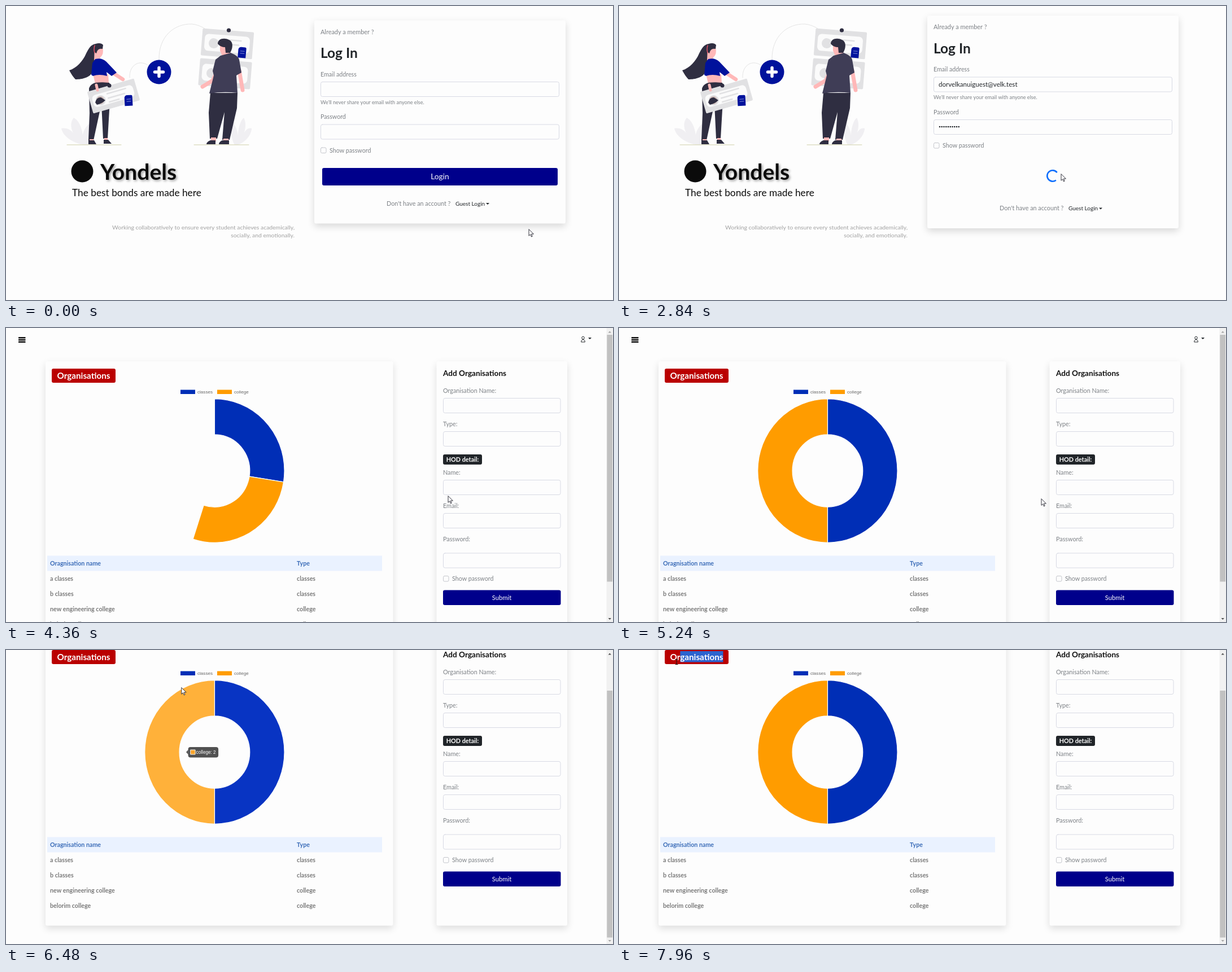
An HTML page with a canvas for the animation above (8000 ms loop, 1075 by 521 pixels).

```html
<!DOCTYPE html>
<html lang="en">
<head>
<meta charset="utf-8">
<title>Sign in and dashboard</title>
<style>
  html, body { margin: 0; width: 100%; height: 100%; overflow: hidden; background: #fdfdfd; }
  canvas { display: block; width: 1075px; height: 521px; }
</style>
</head>
<body>
<canvas id="stage" width="1075" height="521"></canvas>
<script>
const ctx = document.getElementById('stage').getContext('2d');
const LOOP = 8000, PAGE = 4160;
const SANS = 'Lato, "Open Sans", sans-serif', ARIAL = '"Liberation Sans", Arial, sans-serif';
const GREY = '#7d8186', INK = '#212529', NAVY = '#00008b', BLUE = '#00129c', DARK = '#2f2e41', SKIN = '#ffb8b8';

const clamp = v => Math.max(0, Math.min(1, v));
const span = (t, a, b) => clamp((t - a) / (b - a));
const mix = (a, b, k) => a + (b - a) * k;
const quart = k => 1 - (1 - k) ** 4;
const mixRgb = (a, b, k) => `rgb(${a.map((v, i) => Math.round(mix(v, b[i], k)))})`;

// Position along [time, x, y] stops
function along(stops, t) {
  let i = 0;
  while (i < stops.length - 2 && t > stops[i + 1][0]) i++;
  const [a, b] = [stops[i], stops[i + 1]], k = span(t, a[0], b[0]);
  return [mix(a[1], b[1], k), mix(a[2], b[2], k)];
}

function text(str, x, cy, size, color = GREY, weight = 400, align = 'left', family = SANS) {
  ctx.font = `${weight} ${size}px ${family}`;
  ctx.textAlign = align;
  ctx.textBaseline = 'alphabetic';
  ctx.fillStyle = color;
  ctx.fillText(str, x, cy + size * 0.34);
}

function box(x, y, w, h, r, fill, stroke, line = 1) {
  ctx.beginPath();
  ctx.roundRect(x, y, w, h, r);
  if (fill) { ctx.fillStyle = fill; ctx.fill(); }
  if (stroke) { ctx.strokeStyle = stroke; ctx.lineWidth = line; ctx.stroke(); }
}

function card(x, y, w, h, shade = 0.15) {
  ctx.save();
  ctx.shadowColor = `rgba(0,0,0,${shade})`;
  ctx.shadowBlur = 13;
  ctx.shadowOffsetY = 5;
  box(x, y, w, h, 3, '#fdfdfd');
  ctx.restore();
}

const field = (x, y, w, h = 26) => box(x + .5, y + .5, w - 1, h, 3, '#fdfdfd', '#d8dae4');
const tick = (x, y) => box(x + .5, y + .5, 9.5, 9.5, 2, '#fdfdfd', '#c4c6cc');
function shape(d, fill) { ctx.fillStyle = fill; ctx.fill(new Path2D(d)); }
function line(d, color, width) {
  ctx.strokeStyle = color;
  ctx.lineWidth = width;
  ctx.lineCap = ctx.lineJoin = 'round';
  ctx.stroke(new Path2D(d));
}
function dot(x, y, r, fill) {
  ctx.fillStyle = fill;
  ctx.beginPath();
  ctx.arc(x, y, r, 0, 7);
  ctx.fill();
}
function caret(x, y) { shape(`M${x} ${y}h6l-3 3z`, INK); }

function idCard(x, y, w, h, deg) {
  ctx.save();
  ctx.translate(x, y);
  ctx.rotate(deg * Math.PI / 180);
  box(-w / 2, -h / 2, w, h, 2, '#e1e1e3');
  box(-w / 2 + 5, -h / 2 + 9, w - 11, h - 18, 7, '#fbfbfb');
  line('M-10 -7H24M-10 1H20M-10 8H8', '#e1e1e3', 2.5);
  dot(-24, 1, 9, '#e1e1e3');
  ctx.restore();
}
function badgeDoc(x, y, deg) {
  ctx.save();
  ctx.translate(x, y);
  ctx.rotate(deg * Math.PI / 180);
  shape('M-7 -6Q-6 -10 -2 -10H5Q7 -10 7 -8V9H-7z', BLUE);
  line('M-3 -3H4M-3 1H4', '#8890d8', 1);
  ctx.restore();
}

function leaves(x, dir) {
  ctx.save();
  ctx.translate(x, 246);
  ctx.scale(dir, 1);
  shape('M0 0C-20 -4 -36 -15 -39 -29C-29 -31 -22 -26 -18 -21C-23 -31 -23 -41 -17 -48C-5 -41 0 -24 0 0z', '#f0eff2');
  shape('M-2 0C-4 -20 3 -34 15 -40C20 -25 16 -8 8 0z', '#f0eff2');
  ctx.restore();
}

function woman() {
  shape('M168 67C151 65 148 73 142 84C136 98 125 110 112 114C116 121 119 126 123 130C135 130 151 127 155 113C159 103 158 91 164 87z', DARK);
  shape('M157 72L171 73Q174 86 167 91L166 97L156 96z', SKIN);
  shape('M154 80C151 66 167 63 172 69L171 76Q162 74 160 84z', DARK);
  line('M157 70Q155 77 157 83', '#f0566a', 1.4);
  shape('M159 122L181 121L182 137L160 140z', SKIN);
  line('M190 119L207 130M157 119L164 149', SKIN, 6.5);
  shape('M147 146C151 136 158 134 183 136C186 148 186 160 183 184L180 235H172L169 173L155 238H146L148 190z', DARK);
  shape('M148 236h7v5h-7zM174 234h6v6h-6z', SKIN);
  shape('M146 238h10l4 7h-14zM173 237h8l6 7h-14z', DARK);
  shape('M158 94Q170 91 178 99L196 118L187 124L178 117L179 124Q165 120 154 124L151 122L153 101z', BLUE);
  idCard(190.5, 159.5, 86, 40, -16);
  dot(167, 167, 7, '#ceb9b6');
  shape('M158 171Q160 162 168 162L176 167Q170 173 161 175z', DARK);
  dot(183, 141, 3.5, DARK);
  badgeDoc(217, 168, -3);
  line('M160 140L162 149', SKIN, 5);
}

function man() {
  idCard(392, 67, 91, 48, 4.5);
  idCard(388, 120, 92, 48, 4.5);
  dot(394.5, 43, 3.6, DARK);
  badgeDoc(418, 83, 5);
  line('M374 116L366 132L348 143M413 114L419 149', SKIN, 7);
  shape('M379 66L396 68L398 88L384 91L379 79z', SKIN);
  shape('M375 67C375 57 388 55 397 61C404 67 400 78 397 83H389L388 73Q380 73 375 67z', DARK);
  shape('M362 154H410L409 181L396 237H383L387 188L374 235H361L359 189z', DARK);
  shape('M363 233h9v7h-9zM385 235h9v5h-9z', SKIN);
  shape('M362 238h9v7h-16q0-4 7-7zM383 238h12v7h-18q0-4 6-7z', DARK);
  shape('M380 88L398 83Q411 88 413 95L417 118L408 123L410 154Q385 151 360 155L368 123L366 115L371 95z', '#3f3d56');
}

function illustration() {
  line('M219 127C218 105 235 95 250 104M271 95C270 54 298 31 329 32Q341 33 352 40', '#dedede', .8);
  leaves(137, 1);
  leaves(410, -.65);
  line('M108 246H204M333 246H430', '#d0d0a8', 1);
  woman();
  man();
  dot(271, 117, 21.5, BLUE);
  line('M271 109.5V124.5M263.5 117H278.5', '#fff', 5.5);

  dot(135, 293, 19.5, '#0b0b0b');
  ctx.save();
  ctx.shadowColor = 'rgba(0,0,0,.4)';
  ctx.shadowBlur = 4;
  ctx.shadowOffsetX = ctx.shadowOffsetY = 2;
  text('Yondels', 167, 295, 39, '#0b0b0b', 700);
  ctx.restore();
  text('The best bonds are made here', 117, 331, 17.3, '#0b0b0b');
  text('Working collaboratively to ensure every student achieves academically,', 511, 392.5, 10.4, '#a2a2a2', 400, 'right');
  text('socially, and emotionally.', 511, 406.5, 10.4, '#a2a2a2', 400, 'right');
}

function spinner(t) {
  const a = (t - 2825) / 750 * Math.PI * 2;
  ctx.beginPath();
  ctx.arc(768, 301, 9.7, a + Math.PI / 4, a + Math.PI * 1.75);
  ctx.strokeStyle = '#0d6efd';
  ctx.lineWidth = 2.6;
  ctx.lineCap = 'butt';
  ctx.stroke();
}

function menu(pos) {
  box(790, 340, 73.5, 22, 4, '#fdfdfd', '#b3d0f5', 2.5);
  box(790.5, 363.5, 111, 101, 3, '#fdfdfd', '#dcdce2');
  ['Manager', 'Dean', 'Faculty', 'Student'].forEach((name, i) => {
    const y = 381 + i * 22.4;
    if (Math.abs(pos[1] - y) < 11.2) box(791, y - 11, 110, 22, 0, '#eceef1');
    text(name, 802, y, 11.8, INK);
  });
}

function login(t, pos) {
  const busy = t >= 2800, up = busy ? -8.5 : 0, filled = t >= 2000;
  illustration();
  card(546, 25.5 + up, 445, 360 - 2 * up);
  ctx.save();
  ctx.translate(0, up);
  text('Already a member ?', 557, 46, 10.9);
  text('Log In', 557, 84, 24.5, INK, 700);
  text('Email address', 557, 121, 10.7);
  field(557, 134, 423);
  text("We'll never share your email with anyone else.", 557, 170.5, 9.1);
  text('Password', 557, 196.5, 10.7);
  field(557, 209.5, 423);
  tick(557, 250.5);
  text('Show password', 573, 256, 10.7);
  if (filled) {
    text('dorvelkanuiguest@velk.test', 566, 147.5, 11.6, INK);
    for (let i = 0; i < 10; i++) dot(568 + i * 3.75, 222.5, 1.3, INK);
  }
  ctx.restore();
  if (busy) spinner(t);
  else {
    box(560, 287, 417, 31, 3, NAVY);
    text('Login', 768.5, 302.5, 13.8, '#fff', 400, 'center');
  }
  text("Don't have an account ?", 674, 350 - up, 10.8);
  if (t >= 1000 && !filled) menu(pos);
  text('Guest Login', 796, 350.5 - up, 10, INK);
  caret(850, 349 - up);
}

function slice(from, to, fill) {
  ctx.beginPath();
  ctx.arc(0, 0, 123.7, from - Math.PI / 2, to - Math.PI / 2);
  ctx.arc(0, 0, 62.3, to - Math.PI / 2, from - Math.PI / 2, true);
  ctx.closePath();
  ctx.fillStyle = fill;
  ctx.fill();
  ctx.strokeStyle = '#fdfdfd';
  ctx.lineWidth = 1.3;
  ctx.lineJoin = 'miter';
  ctx.stroke();
}

function donut(t) {
  const grow = quart(span(t, 4180, 5180));
  const onBlue = quart(span(t, 6190, 6590)) * (1 - quart(span(t, 6386, 6786)));
  const onOrange = quart(span(t, 6386, 6786)) * (1 - quart(span(t, 6500, 6900)));
  if (!grow) return;
  ctx.save();
  ctx.translate(369.4, 253);
  ctx.scale(1, 1.03);
  slice(0, grow * Math.PI, mixRgb([0, 46, 182], [24, 64, 222], onBlue));
  slice(grow * Math.PI, grow * Math.PI * 2, mixRgb([255, 156, 0], [255, 187, 88], onOrange));
  ctx.restore();
}

function tooltip(t) {
  const alpha = .68 * span(t, 6190, 6390) * (1 - span(t, 6500, 6700));
  if (!alpha) return;
  const orange = t >= 6386, k = quart(span(t, 6386, 6786)), x = mix(406, 280, k), y = 253;
  ctx.save();
  ctx.globalAlpha = alpha;
  box(x, y - 9, 53.5, 18.5, 4, '#000');
  shape(orange ? `M${x} ${y - 4}l-3.5 4l3.5 4z` : `M${x + 53.5} ${y - 4}l3.5 4l-3.5 4z`, '#000');
  ctx.globalAlpha = clamp(alpha * 1.45);
  box(x + 4.5, y - 4, 8, 8, 0, orange ? '#ffa62a' : '#1238cc', '#fff', 1);
  text(orange ? 'college: 2' : 'classes: 2', x + 14, y, 8.2, '#fff', 400, 'left', ARIAL);
  ctx.restore();
}

function heading(t, pos) {
  const word = 'Organisations', size = 15.2;
  box(81, 72, 113, 25, 3, '#ba0000');
  ctx.font = `700 ${size}px ${SANS}`;
  const left = 137.5 - ctx.measureText(word).width / 2, right = 275 - left;
  if (t >= 7400) {
    let from = right;
    for (let i = word.length; i >= 0; i--) {
      const x = left + ctx.measureText(word.slice(0, i)).width;
      if (x < pos[0] + 3) break;
      from = x;
    }
    box(from, 74, right - from, 19.5, 0, '#2c63cf');
  }
  text(word, left, 84.5, size, '#fff', 700);
}

function dashboard(t, pos, scroll) {
  ctx.save();
  ctx.translate(0, -scroll);
  for (let i = 0; i < 3; i++) box(22, 16 + i * 3.7, 12.5, 2.6, .5, '#111');
  ctx.beginPath();
  ctx.arc(1022, 17.5, 2.3, 0, 7);
  ctx.strokeStyle = INK;
  ctx.lineWidth = 1;
  ctx.stroke();
  line('M1018.7 24.5Q1018.7 20.7 1022 20.7Q1025.3 20.7 1025.3 24.5z', INK, 1);
  caret(1031, 17);

  card(70, 59, 615.5, 501.5, .13);
  card(762.5, 59, 231.5, 501.5, .13);
  heading(t, pos);
  box(309, 109.5, 26, 7.5, 0, '#002eb6');
  text('classes', 339, 113, 8.1, '#666', 400, 'left', ARIAL);
  box(374, 109.5, 26, 7.5, 0, '#ff9c00');
  text('college', 404, 113, 8.1, '#666', 400, 'left', ARIAL);
  donut(t);
  tooltip(t);

  box(73, 403.5, 593, 27, 0, '#eaf2ff');
  const rows = [['Oragnisation name', 'Type'], ['a classes', 'classes'], ['b classes', 'classes'],
    ['new engineering college', 'college'], ['belorim college', 'college']];
  rows.forEach(([name, type], i) => {
    const color = i ? '#797979' : '#3c6db8', y = 417.3 + i * 26.9;
    text(name, 78, y, 10.7, color, 700);
    text(type, 515, y, 10.7, color, 700);
  });

  text('Add Organisations', 774, 80.5, 13.6, '#111', 700);
  const labels = [['Organisation Name:', 111, 124], ['Type:', 170, 183], ['Name:', 256, 269],
    ['Email:', 315.3, 328], ['Password:', 374, 398.5]];
  for (const [name, y, fy] of labels) {
    text(name, 774, y, 10.8);
    field(774, fy, 208.5);
  }
  box(774, 224, 69, 18, 3, INK);
  text('HOD detail:', 808.5, 233.3, 10.8, '#fff', 700, 'center');
  tick(774, 439);
  text('Show password', 790, 444.7, 10.7);
  box(774, 464.5, 208.5, 26.5, 3, NAVY);
  text('Submit', 878, 478, 11.2, '#fff', 400, 'center');
  ctx.restore();

  box(1063.5, 0, 11.5, 521, 0, '#f1f1f1');
  box(1064.3, 12 + scroll * .833, 9.7, 437.5, 0, '#c1c1c1');
  shape('M1066.5 8.5h5.4l-2.7-3z', scroll ? '#505050' : '#a3a3a3');
  shape('M1066.5 514h5.4l-2.7 3z', scroll > 71.5 ? '#a3a3a3' : '#505050');
}

const PATH = [[0, 926, 396], [80, 926, 396], [120, 955, 394], [280, 955, 394], [600, 880, 372], [880, 799, 353],
  [1180, 799, 353], [1480, 828, 424], [1600, 828, 424], [1850, 823, 381], [2080, 823, 381], [2640, 783, 298],
  [4520, 783, 298], [5000, 748, 303], [5880, 748, 303], [6190, 493, 165], [6386, 369.5, 98], [6480, 311, 67],
  [7000, 193, 21], [7400, 193, 21], [7940, 102, 21], [8000, 102, 21]];

function pointer(t, [x, y]) {
  ctx.save();
  ctx.translate(x, y);
  const overMenu = t >= 840 && t < 2000;
  const overButton = t < 2800 && x > 560 && x < 977 && y > 287 && y < 318;
  const overHeading = t > 6600 && x < 194 && y < 24;
  let d;
  if (overHeading) {
    line('M-2 -4.5H2M0 -4.5V4.5M-2 4.5H2', '#151515', 1);
  } else {
    if (overMenu || overButton) {
      d = 'M0 1.5Q1.2 -1 2.4 1.5V6Q4 4.6 5 6.3Q6.6 5.4 7.3 6.9Q9 6.5 9 8.3V12L7.7 15.5H1.8L-2.3 9.7Q-2.6 7.8 -.8 8.5L0 9.3z';
    } else {
      d = 'M0 0V11.3L2.6 8.8L4.5 13L6.2 12.2L4.4 8.1H8z';
    }
    shape(d, '#fff');
    line(d, '#1c1c28', .9);
  }
  ctx.restore();
}

function draw(t) {
  ctx.fillStyle = '#fdfdfd';
  ctx.fillRect(0, 0, 1075, 521);
  const pos = along(PATH, t);
  const scroll = 72 * (1 - (1 - span(t, 5640, 6140)) ** 3);
  if (t < PAGE) login(t, pos);
  else dashboard(t, pos, scroll);
  pointer(t, pos);
}

const start = performance.now();
function tickFrame(now) {
  draw(Math.max(0, now - start) % LOOP);
  requestAnimationFrame(tickFrame);
}
draw(0);
requestAnimationFrame(tickFrame);
</script>
</body>
</html>
```
